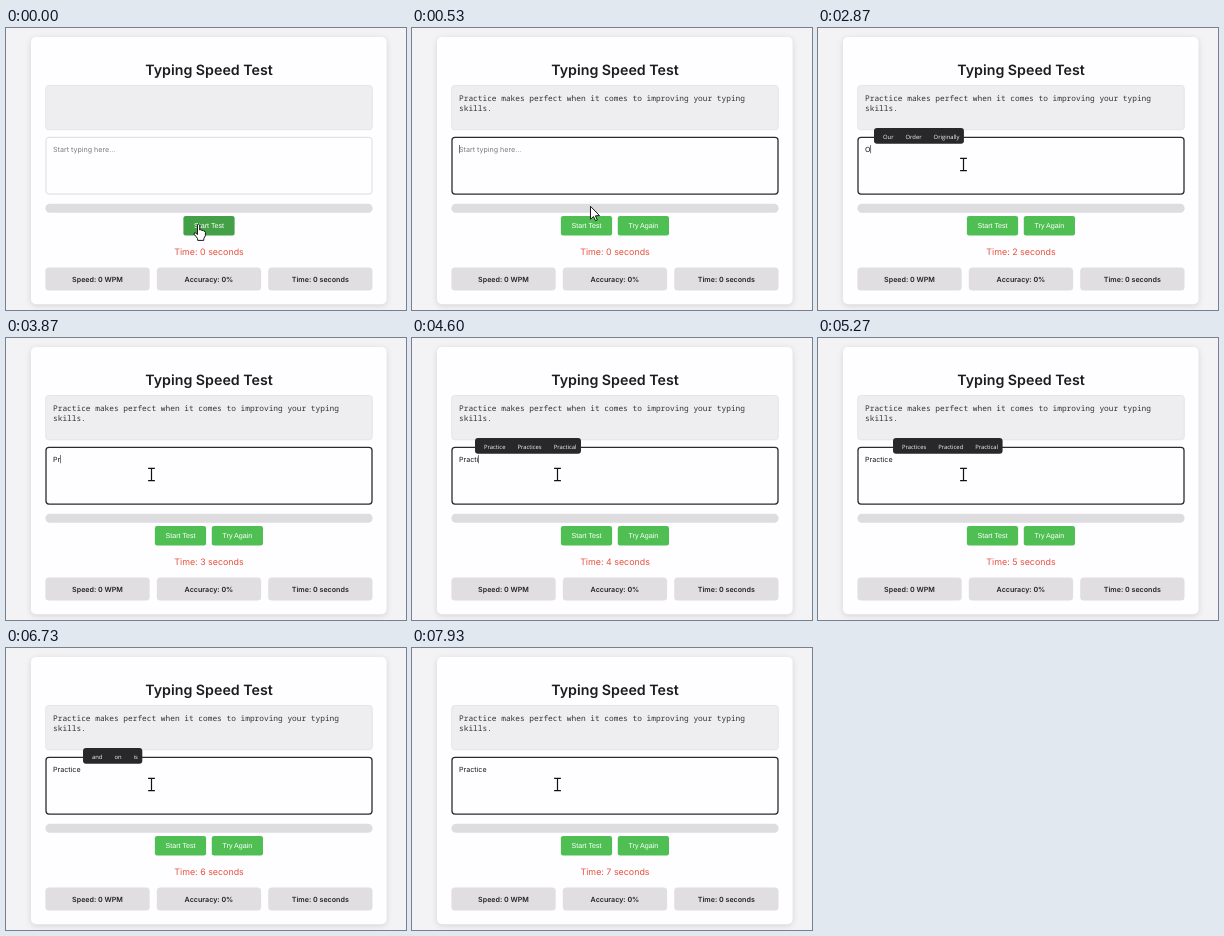
Write an HTML page with a canvas that moves like this. It is 400x282 px and loops after 8 s.

```html
<!DOCTYPE html>
<html lang="en">
<head>
<meta charset="utf-8">
<title>Typing Speed Test</title>
<style>
  html, body { margin: 0; width: 100%; height: 100%; overflow: hidden; background: #f3f2f4; }
  canvas { display: block; width: 400px; height: 282px; }
</style>
</head>
<body>
<canvas id="stage"></canvas>
<script>
const W = 400, H = 282, LOOP = 8000;
const canvas = document.getElementById('stage');
const dpr = window.devicePixelRatio || 1;
canvas.width = W * dpr;
canvas.height = H * dpr;
const ctx = canvas.getContext('2d');
ctx.scale(dpr, dpr);
ctx.textRendering = 'geometricPrecision';

const INTER = 'Inter, sans-serif';
const ARIAL = '"Liberation Sans", Arial, sans-serif';
const MONO = '"Noto Sans Mono", monospace';
const MENU = '"Open Sans", sans-serif';

// Everything the session does, in ms
const START = 200;
const MOVE = { from: 350, to: 850, a: [192.5, 196], b: [145.5, 136.5] };
const CLICK = 860;
const KEYS = [
  [2750, 'O'], [3200, ''], [3600, 'P'], [3840, 'Pr'], [4060, 'Pra'], [4220, 'Prac'],
  [4370, 'Pract'], [4500, 'Practi'], [4620, 'Practic'], [4700, 'Practice'], [6150, 'Practice ']
];
const MENUS = [
  { from: 2800, to: 3200, x: 56, words: ['Our', 'Order', 'Originally'] },
  { from: 4400, to: 4760, x: 63, words: ['Practice', 'Practices', 'Practical'] },
  { from: 4760, to: 6150, x: 75, words: ['Practices', 'Practiced', 'Practical'] },
  { from: 6200, to: 7500, x: 77, words: ['and', 'on', 'is'] }
];

function box(x, y, w, h, r, fill, stroke, line = 1) {
  ctx.beginPath();
  ctx.roundRect(x, y, w, h, r);
  if (fill) { ctx.fillStyle = fill; ctx.fill(); }
  if (stroke) { ctx.strokeStyle = stroke; ctx.lineWidth = line; ctx.stroke(); }
}

function text(str, x, y, font, color, align = 'left') {
  ctx.font = font;
  ctx.fillStyle = color;
  ctx.textAlign = align;
  ctx.fillText(str, x, y);
}

function polygon(points, x, y) {
  ctx.beginPath();
  points.forEach(([px, py]) => ctx.lineTo(x + px, y + py));
  ctx.closePath();
  ctx.fillStyle = '#fff';
  ctx.fill();
  ctx.strokeStyle = '#1a1a1a';
  ctx.lineWidth = 1;
  ctx.lineJoin = 'round';
  ctx.stroke();
}

function button(label, x, hover) {
  box(x, 188, 51.2, 19.5, 2.2, hover ? '#43a047' : '#4fbf53');
  text(label, x + 25.6, 200.3, `7.11px ${ARIAL}`, '#fff', 'center');
}

function card() {
  ctx.fillStyle = '#f3f2f4';
  ctx.fillRect(0, 0, W, H);
  ctx.save();
  ctx.shadowColor = 'rgba(0,0,0,0.13)';
  ctx.shadowBlur = 6 * dpr;
  ctx.shadowOffsetY = 1.5 * dpr;
  box(25, 9, 355.6, 267.3, 5, '#fefdff');
  ctx.restore();
  text('Typing Speed Test', 203, 46.8, `600 14.22px ${INTER}`, '#1c1c1e', 'center');
  box(39.7, 57.5, 326.6, 44.3, 3, '#eeedef', '#e2e1e3', 0.8);
  box(39.4, 175.8, 327.2, 9, 4.5, '#dddcdf');
  ['Speed: 0 WPM', 'Accuracy: 0%', 'Time: 0 seconds'].forEach((label, i) => {
    const x = 39.4 + i * 111.4;
    box(x, 239.4, 104.3, 23, 3.5, '#e0dee1');
    text(label, x + 52.1, 253.5, `600 7.11px ${INTER}`, '#222', 'center');
  });
}

function textarea(t) {
  const focused = t >= START;
  const font = `7.11px ${INTER}`;
  box(40, 109.3, 326, 56.8, 3, '#fefdff', focused ? '#2b2b2e' : '#dad9dc', focused ? 1.3 : 0.9);
  const key = KEYS.filter(k => k[0] <= t).pop();
  const typed = key ? key[1] : '';
  if (typed) text(typed, 47, 123.5, font, '#151515');
  else text('Start typing here...', 47, 123.5, font, '#7b7a7d');

  const last = key ? key[0] : t >= CLICK ? CLICK : START;
  if (focused && (t - last) % 1060 < 530) {
    ctx.font = font;
    ctx.fillStyle = '#222';
    ctx.fillRect(47 + ctx.measureText(typed).width, 117, 0.6, 8.3);
  }
}

function suggestions(t) {
  const menu = MENUS.find(m => t >= m.from && t < m.to);
  if (!menu) return;
  const font = `5.85px ${MENU}`;
  ctx.font = font;
  const widths = menu.words.map(w => ctx.measureText(w).width);
  const total = widths.reduce((a, b) => a + b, 0);
  box(menu.x, 100, total + 37.5, 15.8, 3, '#28272a');
  let x = menu.x + 9;
  menu.words.forEach((word, i) => {
    text(word, x, 110.9, font, '#f4f4f4');
    x += widths[i] + 12;
  });
}

function pointer(t) {
  const p = Math.min(1, Math.max(0, (t - MOVE.from) / (MOVE.to - MOVE.from)));
  const e = p * p * (3 - 2 * p);
  return MOVE.a.map((v, i) => v + (MOVE.b[i] - v) * e);
}

function drawPointer([x, y]) {
  if (y >= 188 && y <= 208) {
    polygon([[-1, 1], [0, 0], [1.2, 1], [1.2, 6], [2.4, 5.6], [3.4, 6.5], [4.6, 6.3],
      [5.4, 7.2], [6.5, 7.4], [7, 8.6], [6.8, 12], [5.4, 14.2], [5.2, 16.4],
      [-0.8, 16.4], [-1, 14.4], [-4.4, 10.2], [-4.2, 9], [-2.8, 9], [-1, 10.6]], x, y);
  } else if (y > 167) {
    polygon([[0, 0], [0, 13], [3, 10.3], [5, 14.5], [6.8, 13.6], [4.9, 9.6], [9, 9.3]], x, y);
  } else {
    ctx.beginPath();
    ctx.moveTo(x - 3.4, y - 6.2);
    ctx.lineTo(x + 3.4, y - 6.2);
    ctx.moveTo(x, y - 6.2);
    ctx.lineTo(x, y + 6.2);
    ctx.moveTo(x - 3.4, y + 6.2);
    ctx.lineTo(x + 3.4, y + 6.2);
    ctx.strokeStyle = '#111';
    ctx.lineWidth = 1.2;
    ctx.stroke();
  }
}

function draw(t) {
  const started = t >= START;
  const spot = pointer(t);
  const hover = spot[1] >= 188;
  card();
  if (started) {
    const font = `7.82px ${MONO}`;
    text('Practice makes perfect when it comes to improving your typing', 47, 72.7, font, '#333');
    text('skills.', 47, 83.1, font, '#333');
  }
  textarea(t);
  suggestions(t);

  if (started) {
    button('Start Test', 148.9, hover);
    button('Try Again', 205.8, false);
  } else {
    button('Start Test', 177.4, hover);
  }
  const secs = started ? Math.floor((t - START) / 1000) : 0;
  text(`Time: ${secs} second${secs === 1 ? '' : 's'}`, 203, 226.8, `8.89px ${INTER}`, '#e5533d', 'center');
  drawPointer(spot);
}

const origin = performance.now();
function tick() {
  draw((performance.now() - origin) % LOOP);
  requestAnimationFrame(tick);
}
tick();
</script>
</body>
</html>
```
